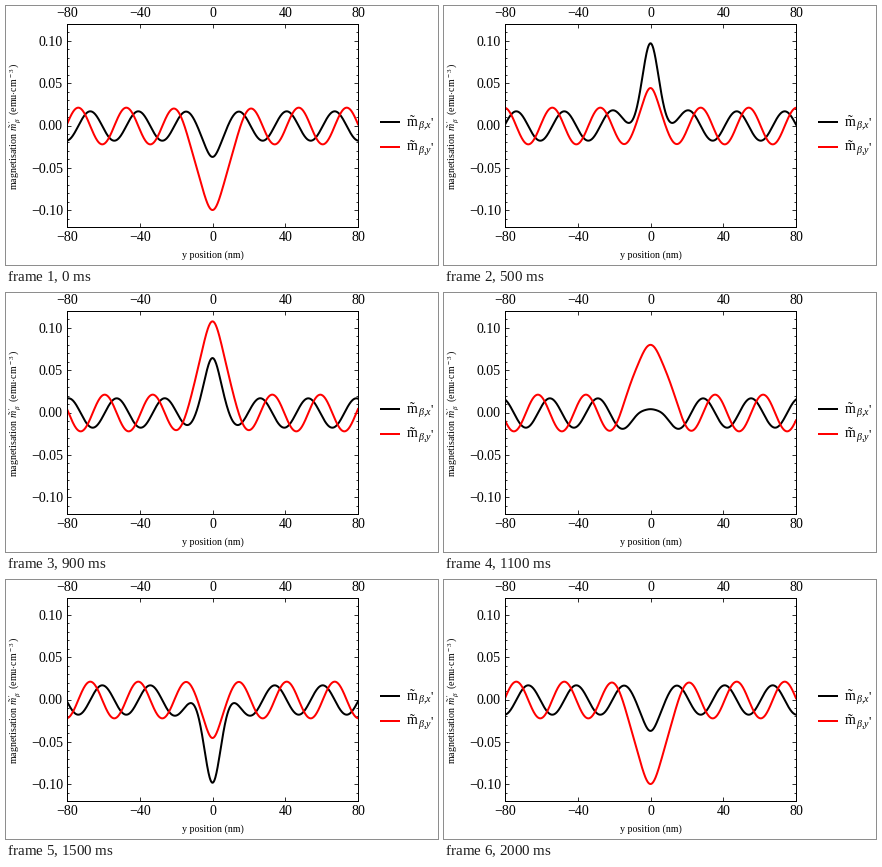
Recreate the animation shown at these times as a matplotlib script. Size 432 by 259 pixels, loop 2.1 s.

```python
import matplotlib.pyplot as plt
import numpy as np
from matplotlib.animation import FuncAnimation
from matplotlib.ticker import MultipleLocator

W, H, DPI = 432, 259, 72        # at 72 dpi one point is one pixel
STEPS = 20                      # steps per wave period
FRAMES, INTERVAL = 21, 100

plt.rcParams.update({
    "font.family": "Liberation Serif",
    "mathtext.fontset": "custom",
    "mathtext.rm": "Liberation Serif",
    "mathtext.it": "Liberation Serif:italic",
    "axes.linewidth": 1,
})

LAMBDA = 26.4                   # wavelength, nm
K = 2 * np.pi / LAMBDA
RISE = 5.5                      # width of the wave onset, nm
OFFSET = -0.0006

y = np.linspace(-80, 80, 801)
outgoing = np.cos(K * y) + 1j * np.sin(K * np.abs(y)) * np.tanh(np.abs(y) / RISE)


def peak(height, width):
    return height / np.cosh(y / width) ** 2


def profile(amp, crest, near):
    """Complex amplitude: outgoing wave plus a localised central response."""
    return amp * np.exp(-1j * K * crest) * outgoing + near


def at_step(prof, n):
    return (prof * np.exp(-2j * np.pi * n / STEPS)).real + OFFSET


def label(x, top, text, **style):
    fig.text(x / W, 1 - top / H, text, **style)


fig = plt.figure(figsize=(W / DPI, H / DPI), dpi=DPI, facecolor="white")
left, right, top, bottom = 61, 352, 18, 221
ax = fig.add_axes([left / W, 1 - bottom / H, (right - left) / W, (bottom - top) / H])
ax.set(xlim=(-80, 80), ylim=(-0.1195, 0.1195))
ax.xaxis.set_major_locator(MultipleLocator(40))
ax.yaxis.set_major_locator(MultipleLocator(0.05))
ax.yaxis.set_minor_locator(MultipleLocator(0.01))
ax.yaxis.set_major_formatter(lambda v, _: f"{v + 0.0:.2f}".replace("-", "\u2212"))
ax.tick_params(which="both", direction="in", top=True, right=True, width=0.8)
ax.tick_params(which="major", length=4, labelsize=14, labeltop=True, pad=4)
ax.tick_params(which="minor", length=2.4)

series = [
    ("black", "x", 116,
     profile(0.0173, 14.4, peak(-0.0198, 5.2) + 1j * peak(0.0925, 7.3))),
    ("red", "y", 141,
     profile(0.0216, 21.0, peak(-0.1050, 7.0) + 1j * peak(0.0240, 5.0))),
]
curves = []
for color, comp, row, prof in series:
    curves.append((ax.plot(y, at_step(prof, 0), color=color, lw=2)[0], prof))
    level = 1 - row / H
    fig.add_artist(plt.Line2D([375 / W, 393 / W], [level, level], color=color, lw=2))
    base = row + 3.5
    label(400.5, base, "m", size=14, va="baseline")
    label(406, base, "\u02dc", size=14, ha="center", va="baseline")
    label(411.5, base + 2.5, rf"$\beta{{,}}{comp}$", size=10, va="baseline")
    label(424.5, base, "'", size=13, va="baseline")

label(206.5, 252, "y position (nm)", size=10, ha="center", va="baseline")
label(9, 120.5,
      r"magnetisation $\,\tilde{m}_{\beta}^{\,\prime}\;$ (emu$\cdot$cm$^{\,-3}\,$)",
      size=10, rotation=90, ha="center", va="center")


def update(n):
    for line, prof in curves:
        line.set_ydata(at_step(prof, n))
    return [line for line, _ in curves]


anim = FuncAnimation(fig, update, frames=FRAMES, interval=INTERVAL,
                     repeat=True, repeat_delay=0)
plt.show()
```
